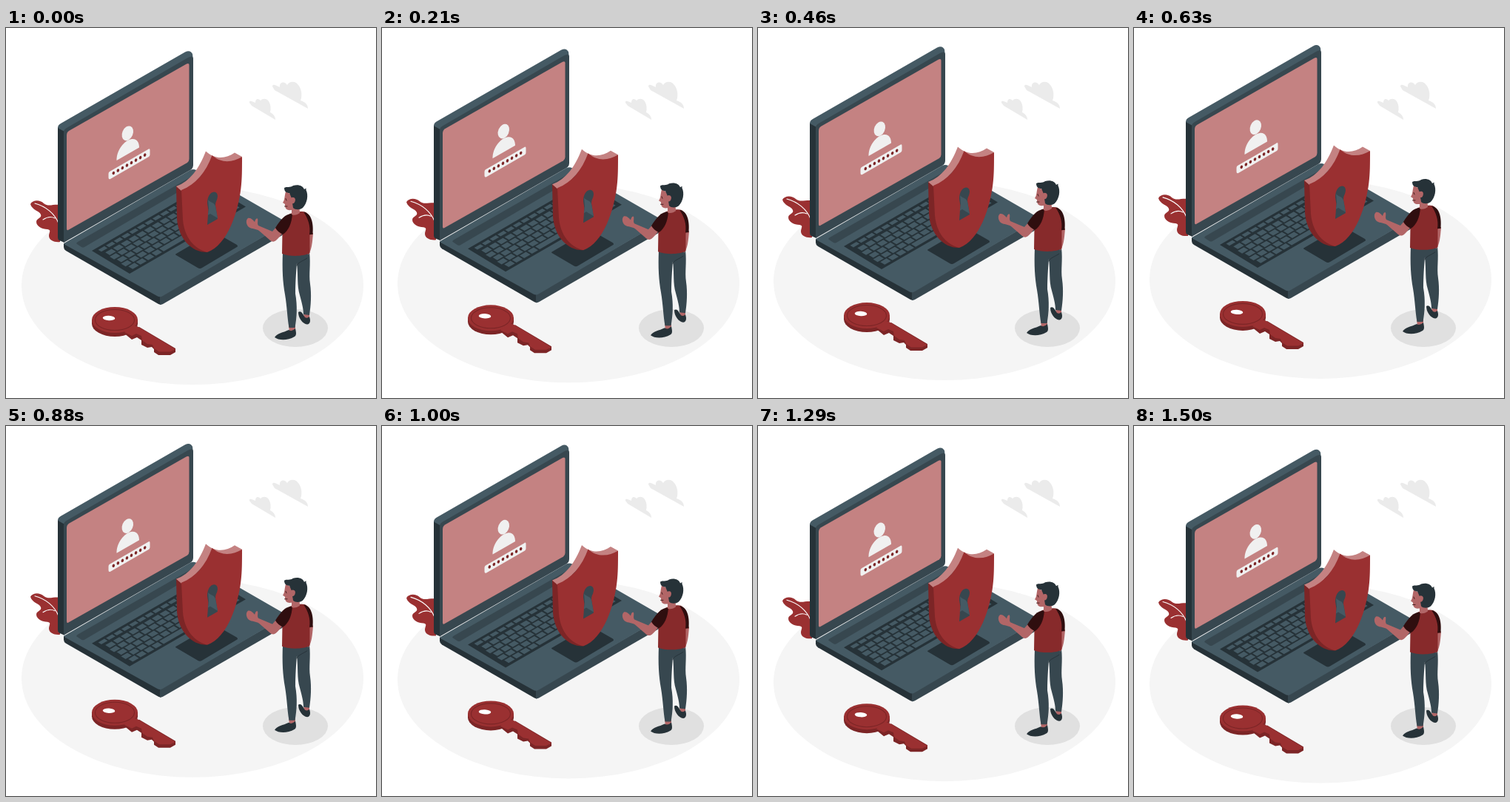
Recreate the animation shown at these times as an HTML page with a canvas. Size 500x500 px, loop 1.54 s.

```html
<!DOCTYPE html>
<html lang="en">
<head>
<meta charset="utf-8">
<title>Login security</title>
<style>
html, body { margin: 0; width: 100%; height: 100%; overflow: hidden; background: #fff; }
canvas { display: block; width: 100vw; height: 100vh; }
</style>
</head>
<body>
<canvas id="stage"></canvas>
<script>
const SIZE = 500, LOOP = 1540, FPS = 24;
const RISE = 10, PEAK = 716;

const DARK = '#263238', MID = '#37474f', SLATE = '#455a64';
const RED = '#9a3031', DEEP_RED = '#7c2526', PINK = '#c48282';
const SHIRT = '#872a2b', SLEEVE = '#2f0e0f', SKIN = '#b26667';
const PALE = '#f0f0f0', CLOUD = '#ebebeb';

const canvas = document.getElementById('stage');
const ctx = canvas.getContext('2d');
const ratio = window.devicePixelRatio || 1;
canvas.width = canvas.height = SIZE * ratio;

function fill(color, d) {
  ctx.fillStyle = color;
  ctx.fill(new Path2D(d));
}

function line(color, width, d) {
  ctx.strokeStyle = color;
  ctx.lineWidth = width;
  ctx.lineCap = 'round';
  ctx.stroke(new Path2D(d));
}

function oval(color, x, y, rx, ry, turn = 0) {
  ctx.beginPath();
  ctx.ellipse(x, y, rx, ry, turn, 0, Math.PI * 2);
  ctx.fillStyle = color;
  ctx.fill();
}

function clouds() {
  fill(CLOUD, 'M360 79C360 75 364 77 370 80C369 73 376 71 380 77C383 72 388 72 392 74C399 79 401 90 398 98C404 100 408 103 408 109L363 84Z');
  fill(CLOUD, 'M329 101C328 97 333 99 337 101C337 95 341 95 344 98C347 95 352 95 355 99C358 104 358 109 357 114C361 116 364 119 364 124L332 105Z');
}

function leaf() {
  fill(RED, 'M33 238C36 232 46 232 51 237C57 242 63 238 73 239V289C66 290 58 287 58 281C58 276 62 273 56 272C49 272 41 268 41 262C41 257 49 257 47 252C45 247 35 246 33 238Z');
  line('#fff', 1.1, 'M39 237C54 241 66 251 71 264M50 259C56 255 62 255 66 257');
}

function lid() {
  fill(DARK, 'M70 134L79 136V290L72 287Q70 286 70 283Z');
  fill(SLATE, 'M70 135Q70 131 74 129L242 32.5Q249 29 252 35L253 44L79 140Z');
  fill(MID, 'M78 141Q78 137 82 135L246 40Q253 36 253 42V185Q253 190 249 192L78 290Z');
  fill(PINK, 'M82 145Q82 141 85 139L244 48.5Q247.500 47 247.500 50V177Q247.500 180 245 182L84 273Q82 274 82 271Z');
}

function loginPanel() {
  oval(PALE, 164.300, 142.300, 7.200, 10.300, 0.4);
  fill(PALE, 'M149.500 179C149 166 159 152 170 150C177 149 180 155 180 161.500Z');
  fill(PALE, 'M138.500 197Q138.500 195 140 194L192 164Q194.500 162 194.500 165V171Q194.500 173 193 174L141 204Q138.500 205 138.500 202Z');
  for (let i = 0; i < 8; i++) oval(DEEP_RED, 145.300 + i * 6.050, 196 - i * 3.480, 1.700, 2.300, 0.4);
}

// Point on the keyboard plane; u runs along a row, v from back to front.
const keyPoint = (u, v) => `${116 + 157 * u + 51 * v} ${301 - 90.5 * u + 31 * v}`;
const keyQuad = (u0, v0, u1, v1) =>
  `M${keyPoint(u0, v0)}L${keyPoint(u1, v0)}L${keyPoint(u1, v1)}L${keyPoint(u0, v1)}Z`;

function keyboard() {
  fill(DARK, keyQuad(0, 0, 1, 1));
  const rows = 6, columns = 14, start = 0.035, pitch = 0.933 / columns;
  for (let row = 0; row < rows; row++) {
    const top = 0.06 + row * 0.152;
    const bottom = top + (row ? 0.118 : 0.085);
    const shift = row ? (row % 2) * 0.012 : 0;
    for (let col = 0; col < columns; col++) {
      const inSpace = row === rows - 1 && col > 3 && col < 9;
      if (inSpace && col > 4) continue;
      const left = start + col * pitch + shift;
      fill(SLATE, keyQuad(left, top, left + pitch * (inSpace ? 5 : 1) - 0.013, bottom));
    }
  }
}

function base() {
  fill(DARK, 'M78 291L209 363V374L206 373L81 301Q78 299 78 296Z');
  fill(MID, 'M208 363L378 264V275Q378 277 375 279L212 373Q210 374 208 374Z');
  fill(SLATE, 'M80 290L249 192Q253 190 257 192L375 260Q379 263 375 266L212 362Q208 364.500 204 362L80 293Q77 291 80 290Z');
  fill(MID, 'M97 289L252 200L261 205L106 296Q104 297 102 296L96 292Q94 291 97 289Z');
  keyboard();
  fill(DARK, 'M230 305L278 277Q281 275 284 277L312 293Q314 295 312 296L265 324Q262 326 259 324L230 307Q228 306 230 305Z');
}

function shield() {
  fill(DEEP_RED, 'M230 214L231 258C233 284 250 303 271 303L290 250L260 205Z');
  fill(PINK, 'M230 214C249 207 261 190 270 166.500C282 178 297 177 309 168.500L319 174L300 190L280 182L250 214L237 220Z');
  fill(RED, 'M237 219C257 211 270 195 278.500 172C292 184 307 181 319 174C319 190 319 205 317.500 216C314 247 300 293 272 303C254 298 241 283 239 259Z');
  fill(MID, 'M272 237C272 228 276 222 281 221.500C286 221.500 287 227 285 232C283 236 282.500 239 283.500 243L286 258L272 266L273.500 246Z');
  fill(SLATE, 'M273 232C275 236 283 235 283.500 243L286 257L276 251L272.700 253L274 244Z');
}

function keyItem() {
  oval(DEEP_RED, 147, 399.500, 31, 17.500);
  fill(DEEP_RED, 'M116 394H178V400H116Z');
  fill(DEEP_RED, 'M159 412L170 421L177 418L183 422V428L191 432L197 431L200 434V438L206 442H222L229 438V433L180 404Z');
  oval(RED, 147, 394.500, 31, 17.500);
  fill(RED, 'M168 402L177 403L229 434L222 437.500H207L200 433L198 428L191 427L184 422L183 416L176 413L170 416L160 411Z');
  ctx.beginPath();
  ctx.ellipse(147, 394.500, 26.500, 14, 0, 0, Math.PI * 2);
  ctx.strokeStyle = DEEP_RED;
  ctx.lineWidth = 1.1;
  ctx.stroke();
  oval('#fff', 139, 392, 8.300, 3.200, 0.05);
}

function legs() {
  fill(SKIN, 'M382 402H391V411H383ZM402 384L410 386V394L403 392Z');
  fill(DARK, 'M363 418C367 412 374 412 382 408Q386 411 391 406C392 411 393 415 390 417C380 423 368 422 363 418Z');
  fill(DARK, 'M395 384C399 381 402 388 404 391Q407 393 410 390C412 396 411 400 407 400.500C401 400 395 392 395 384Z');
  fill(MID, 'M374 303C373 326 374 344 377 360C380 378 380 391 382.500 405H390.500C393 391 394 376 391 359C391 345 392 330 393 318C395 334 393 348 397 361C400 372 402 380 402 387L410 388C412 375 413 360 411 346C409 332 412 320 410 303Z');
  line(DARK, 0.9, 'M393 321C394 317 401 315 407 311');
}

function torso() {
  fill(SKIN, 'M410 276L415 277C414 290 413 301 408 307Z');
  fill(SHIRT, 'M384 251C391 248 400 247 405 249C413 255 413 263 413 278L410.500 280V304C402 309 383 309 373 305L373.500 276C376 262 380 253 384 251Z');
  fill(SLEEVE, 'M402 248.500C412 250 416 262 414.500 279L410 279C412 268 408 257 402 248.500Z');
  fill(SKIN, 'M366 268L360 275L341 267C339 264 341 261 340 257.500C337 257 337 260 336 262C334 260 331 256 327 257C324 259 324 265 328 269C333 272 338 271 342 274L357 287C362 291 365 288 373 278Z');
  fill(SLEEVE, 'M387 251C377 251 371 259 364 270C366 274 370 277 374 279C382 274 386 264 387 251Z');
}

function head() {
  fill(SKIN, 'M378 221C376 228 377 232 374 236L377 238C377 243 378 247 386 246V252C390 254 394 252 397 250L396 230Z');
  fill(DARK, 'M376 216C379 214 384 216 388 213C395 211 401 213 403 218L405.500 216.500V219C409 226 407 237 401 243C397 246 391 246 388 243L386 230L383 223C379 223 376 221 376 216Z');
  oval(SKIN, 387.500, 233, 3.300, 4.200, 0.25);
  line(SLEEVE, 0.8, 'M378 230.500L379 233M376.500 241H380');
}

function render(time) {
  // Pictures advance 24 times a second; the scene bobs at constant speed.
  const frame = Math.floor((time % LOOP + 5) * FPS / 1000);
  const now = frame * 1000 / FPS;
  const height = at => RISE * (1 - Math.abs(at - PEAK) / (LOOP / 2));
  const lift = Math.abs(height(now)) - height(0);

  ctx.setTransform(ratio, 0, 0, ratio, 0, 0);
  ctx.fillStyle = '#fff';
  ctx.fillRect(0, 0, SIZE, SIZE);
  oval('#f5f5f5', 252, 348 - lift, 231, 134);
  oval('#e0e0e0', 391, 405.500, 44, 25.500);
  clouds();

  ctx.translate(0, -lift);
  leaf();
  base();
  lid();
  loginPanel();
  shield();
  keyItem();
  legs();
  torso();
  head();
}

let began;
function tick() {
  const now = performance.now();
  began ??= now;
  render(now - began);
  requestAnimationFrame(tick);
}
tick();
</script>
</body>
</html>
```
